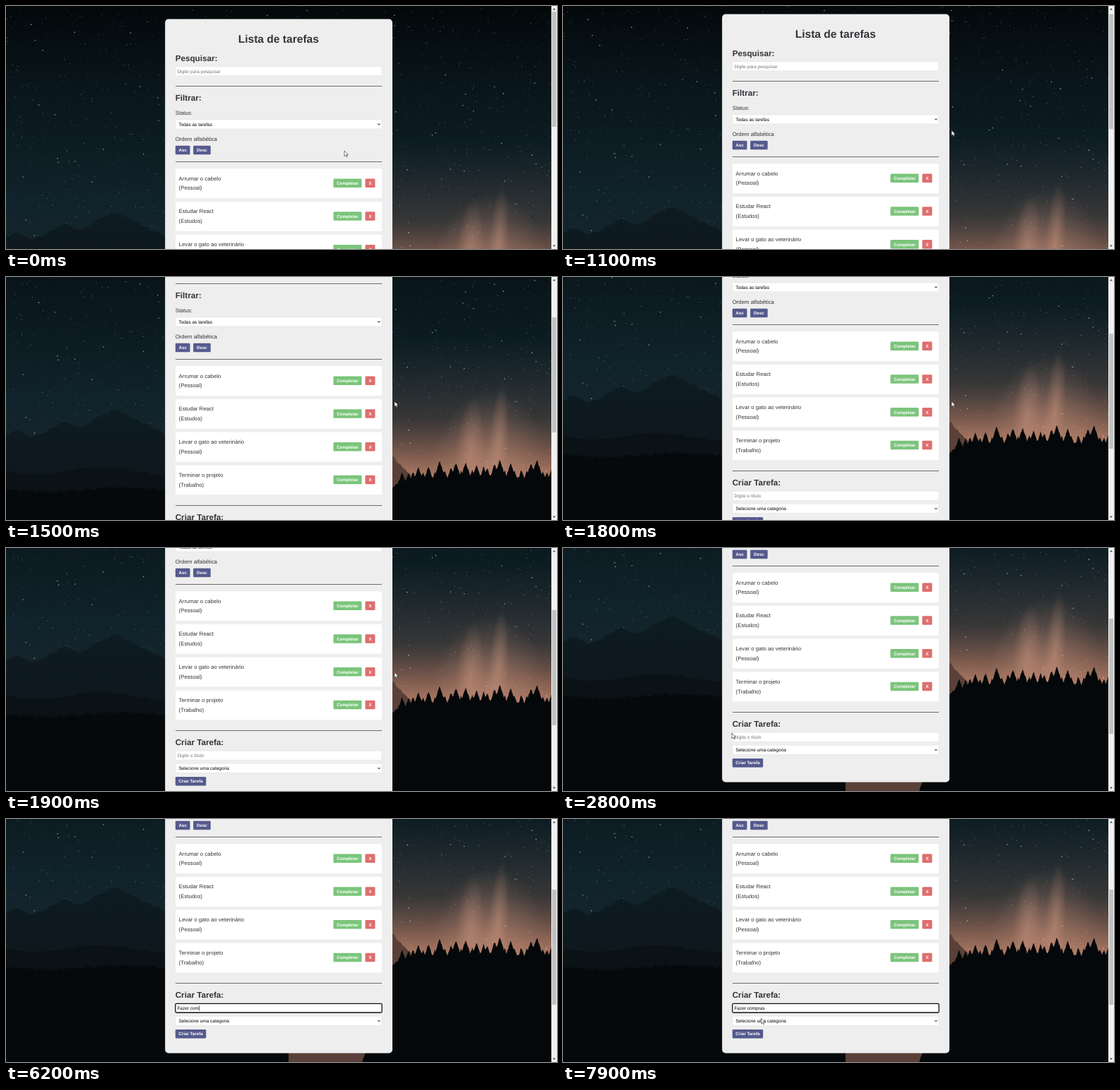
An HTML page for the animation above (8 s loop, 780 by 344 pixels).

```html
<!DOCTYPE html>
<html lang="pt-BR">
<head>
<meta charset="utf-8">
<title>Lista de tarefas</title>
<style>
html, body { margin: 0; width: 100%; height: 100%; overflow: hidden; background: #05090b; }
svg { display: block; width: 780px; height: 344px; font-family: "Liberation Sans", Arial, sans-serif; }
text { fill: #333439; font-size: 7.79px; white-space: pre; text-rendering: geometricPrecision; }
.h1 { font-size: 15.58px; font-weight: bold; text-anchor: middle; }
.h2 { font-size: 11.68px; font-weight: bold; }
.field { font-size: 6.49px; fill: #000; }
.hint { font-size: 6.49px; fill: #757575; }
.button { font-size: 6.2px; font-weight: bold; fill: #fff; text-anchor: middle; }
</style>
</head>
<body>
<svg viewBox="0 0 780 344">
  <defs>
    <linearGradient id="sky" x1="0" y1="0" x2="0" y2="1">
      <stop offset="0" stop-color="#03080a"/>
      <stop offset=".2" stop-color="#09151a"/>
      <stop offset=".5" stop-color="#10222a"/>
      <stop offset=".75" stop-color="#18282f"/>
    </linearGradient>
    <linearGradient id="dusk" x1="0" y1="0" x2="0" y2="1">
      <stop offset="0" stop-color="#3a3837" stop-opacity="0"/>
      <stop offset=".55" stop-color="#4f423e" stop-opacity=".6"/>
      <stop offset=".8" stop-color="#855f50" stop-opacity=".9"/>
      <stop offset="1" stop-color="#ba8168"/>
    </linearGradient>
    <radialGradient id="beam">
      <stop offset="0" stop-color="#c4917b" stop-opacity=".5"/>
      <stop offset="1" stop-color="#c4917b" stop-opacity="0"/>
    </radialGradient>
    <linearGradient id="rock" x1="0" y1="0" x2="0" y2="1">
      <stop offset="0" stop-color="#0e1b21"/>
      <stop offset="1" stop-color="#0d1418"/>
    </linearGradient>
  </defs>
  <g id="page"></g>
  <rect x="772" width="8" height="344" fill="#f1f1f1"/>
  <path d="M774 5.5l2-2.5 2 2.5zM774 338.5l2 2.5 2-2.5z" fill="#505050"/>
  <rect id="thumb" x="773" width="6" height="163" fill="#c1c1c1"/>
  <path id="arrow" d="M0 0V7.6L1.8 6 3 8.8 4.3 8.2 3.1 5.5H5.5Z" fill="#fff" stroke="#222" stroke-width=".6"/>
  <path id="ibeam" d="M-1.4 -3.8H1.4M0 -3.8V3.8M-1.4 3.8H1.4" fill="none" stroke="#222" stroke-width=".7"/>
</svg>
<script>
const $ = id => document.getElementById(id);
const DURATION = 8000, STEP = 100;

let seed = 11;
const random = () => (seed = seed * 16807 % 2147483647) / 2147483647;

const rect = (x, y, w, h, fill, extra = '') =>
  `<rect x="${x}" y="${y}" width="${w}" height="${h}" fill="${fill}" ${extra}/>`;
const text = (x, y, label, cls = '', id = '') =>
  `<text x="${x}" y="${y}" class="${cls}" id="${id}">${label}</text>`;
const path = (d, fill, extra = '') => `<path d="${d}" fill="${fill}" ${extra}/>`;

// Night landscape
function stars(count, size, opacity) {
  let d = '';
  for (let i = 0; i < count; i++) {
    const x = random() * 772, y = random() * 385;
    d += `M${x.toFixed(1)} ${y.toFixed(1)}h${size}v${size}h-${size}z`;
  }
  return path(d, '#cfdde0', `opacity="${opacity}"`);
}

// Fills everything below height(x), roughened by jitter.
function skyline(x0, x1, step, jitter, fill, height) {
  let d = `M${x0} 545`;
  for (let x = x0; x <= x1; x += step) d += `L${x} ${(height(x) + (random() - .5) * jitter).toFixed(1)}`;
  return path(d + `L${x1} 545Z`, fill);
}

const peaks = [[155, 291], [85, 308], [15, 321]];
const mountain = x => Math.min(...peaks.map(([px, py]) => py + Math.abs(x - px) * .5));

const trees = Array.from({ length: 30 }, (_, i) =>
  ({ x: 552 + i * 7.6 + random() * 3, top: 362 + random() * 20 + 25 * Math.exp(-i / 2.5) }));
const forest = x => Math.min(388 + 14 * Math.exp((547 - x) / 15),
  ...trees.map(tree => tree.top + Math.abs(x - tree.x) * 3));

const beam = (x, y, rx, ry) =>
  `<ellipse cx="${x}" cy="${y}" rx="${rx}" ry="${ry}" fill="url(#beam)" transform="rotate(4 ${x} ${y})"/>`;

const landscape = () =>
  rect(0, 0, 780, 545, 'url(#sky)') +
  rect(400, 190, 380, 205, 'url(#dusk)') +
  beam(685, 365, 80, 100) + beam(697, 340, 14, 85) + beam(657, 350, 20, 75) +
  stars(1700, .7, .3) + stars(480, .9, .5) + stars(90, 1.3, .75) +
  skyline(0, 240, 4, 4, 'url(#rock)', mountain) +
  skyline(0, 240, 5, 3, '#0b1216', x => 378 + 5 * Math.sin(x / 28)) +
  skyline(400, 580, 3, 3, '#5a4038', x => 357 + (x - 547) * 1.1) +
  skyline(0, 400, 1.5, 6, '#05090b', x => 405 + 3 * Math.sin(x / 35)) +
  skyline(400, 772, 1, 2.5, '#05080a', forest);

// Task list
const rule = y => rect(240, y, 292, 1, '#6b6c77');
const box = y => rect(240, y, 292, 13, '#fff', 'stroke="#ddd" stroke-width=".5" rx="1"');
const button = (x, y, w, label, fill) =>
  rect(x, y, w, 12.4, fill, 'rx="1.3"') + text(x + w / 2, y + 8.4, label, 'button');
const select = (y, label) => box(y) + text(244.4, y + 9, label, 'field') +
  `<path d="M526.3 ${y + 5.6}l1.7 1.8 1.7-1.8" fill="none" stroke="#000" stroke-width="1"/>`;

const task = ([title, category], i) => {
  const y = 230.3 + i * 46.75;
  return rect(240, y, 292, 41.8, '#fff', 'rx="2"') +
    text(244.6, y + 16.4, title) + text(244.6, y + 30.1, `(${category})`) +
    button(463.5, y + 14.3, 40, 'Completar', '#7bc47b') +
    button(508.5, y + 14.3, 14, 'X', '#de6e6e');
};

const BLUE = '#555a8d';
const tasks = [['Arrumar o cabelo', 'Pessoal'], ['Estudar React', 'Estudos'],
  ['Levar o gato ao veterinário', 'Pessoal'], ['Terminar o projeto', 'Trabalho']];

$('page').innerHTML = landscape() +
  rect(225.2, 18.6, 321.8, 507.8, '#eee', 'rx="4.9"') +
  text(385.8, 52.4, 'Lista de tarefas', 'h1') +
  text(239.7, 77.8, 'Pesquisar:', 'h2') + box(85.8) + text(242.4, 94.7, 'Digite para pesquisar', 'hint') +
  rule(113) +
  text(239.7, 134.1, 'Filtrar:', 'h2') + text(239.7, 153.7, 'Status:') + select(160.9, 'Todas as tarefas') +
  text(239.7, 191.3, 'Ordem alfabética') +
  button(239.8, 197.8, 20.7, 'Asc', BLUE) + button(265.1, 197.8, 24.6, 'Desc', BLUE) +
  rule(220) +
  tasks.map(task).join('') +
  rule(427) +
  text(239.7, 448.1, 'Criar Tarefa:', 'h2') + box(456.2) +
  rect(239.8, 456.4, 292.4, 12.6, '#fff', 'id="focus" stroke="#101010" stroke-width="1.3" rx="1.5"') +
  text(242.4, 465, 'Digite o título', 'hint', 'hint') +
  text(242.4, 465, '', 'field', 'typed') + rect(0, 459, .6, 7.4, '#000', 'id="caret"') +
  select(474.3, 'Selecione uma categoria') +
  button(239.8, 493, 43.4, 'Criar Tarefa', BLUE);

// Timeline
const ease = p => {
  p = Math.min(1, Math.max(0, p));
  return p * p * (3 - 2 * p);
};

const WHEEL_TICKS = [1000, 1100, 1400, 1700], TICK_HEIGHT = 48.75, TICK_TIME = 420;
const scrollAt = t => Math.round(
  WHEEL_TICKS.reduce((sum, start) => sum + TICK_HEIGHT * ease((t - start) / TICK_TIME), 0));

const moves = [
  { start: 0, end: 500, to: [550, 176] },
  { start: 2300, end: 2600, to: [284, 286] },
  { start: 2700, end: 2800, to: [239, 262] },
  { start: 2800, end: 3600, to: [262, 268] },
  { start: 7600, end: 7700, to: [274, 294] },
  { start: 7800, end: 7900, to: [280.5, 282] },
];
const pointerAt = t => moves.reduce(([x, y], { start, end, to }) => {
  const p = ease((t - start) / (end - start));
  return [x + (to[0] - x) * p, y + (to[1] - y) * p];
}, [479, 205]);

// Typing is hesitant at both ends and quick in the middle.
const FOCUS = 3600, TYPING = 4500, TYPED_TEXT = 'Fazer compras';
const keyTimes = [...TYPED_TEXT].map((_, i) =>
  Math.round((TYPING + i * 2600 / 12 + 170 * Math.sin(i * Math.PI / 6)) / STEP) * STEP);

const show = (id, visible) => $(id).setAttribute('visibility', visible ? 'visible' : 'hidden');

function draw(t) {
  const scroll = scrollAt(t);
  $('page').setAttribute('transform', `translate(0 ${-scroll})`);
  $('thumb').setAttribute('y', 8 + scroll * .472);

  const count = keyTimes.filter(time => time <= t).length;
  const lastInput = count ? keyTimes[count - 1] : FOCUS;
  $('typed').textContent = TYPED_TEXT.slice(0, count);
  $('caret').setAttribute('x', 242.6 + (count ? $('typed').getComputedTextLength() : 0));
  show('hint', count === 0);
  show('focus', t >= FOCUS);
  show('caret', t >= FOCUS && (t - lastInput) % 1000 < 500);

  const [x, y] = pointerAt(t);
  for (const id of ['arrow', 'ibeam']) $(id).setAttribute('transform', `translate(${x} ${y})`);
  show('arrow', t < 3000 || t >= 7800);
  show('ibeam', t >= 3000 && t < TYPING);
}

const start = performance.now();
function tick() {
  const t = (performance.now() - start) % DURATION;
  draw(Math.floor(t / STEP) * STEP);
  requestAnimationFrame(tick);
}
tick();
</script>
</body>
</html>
```
